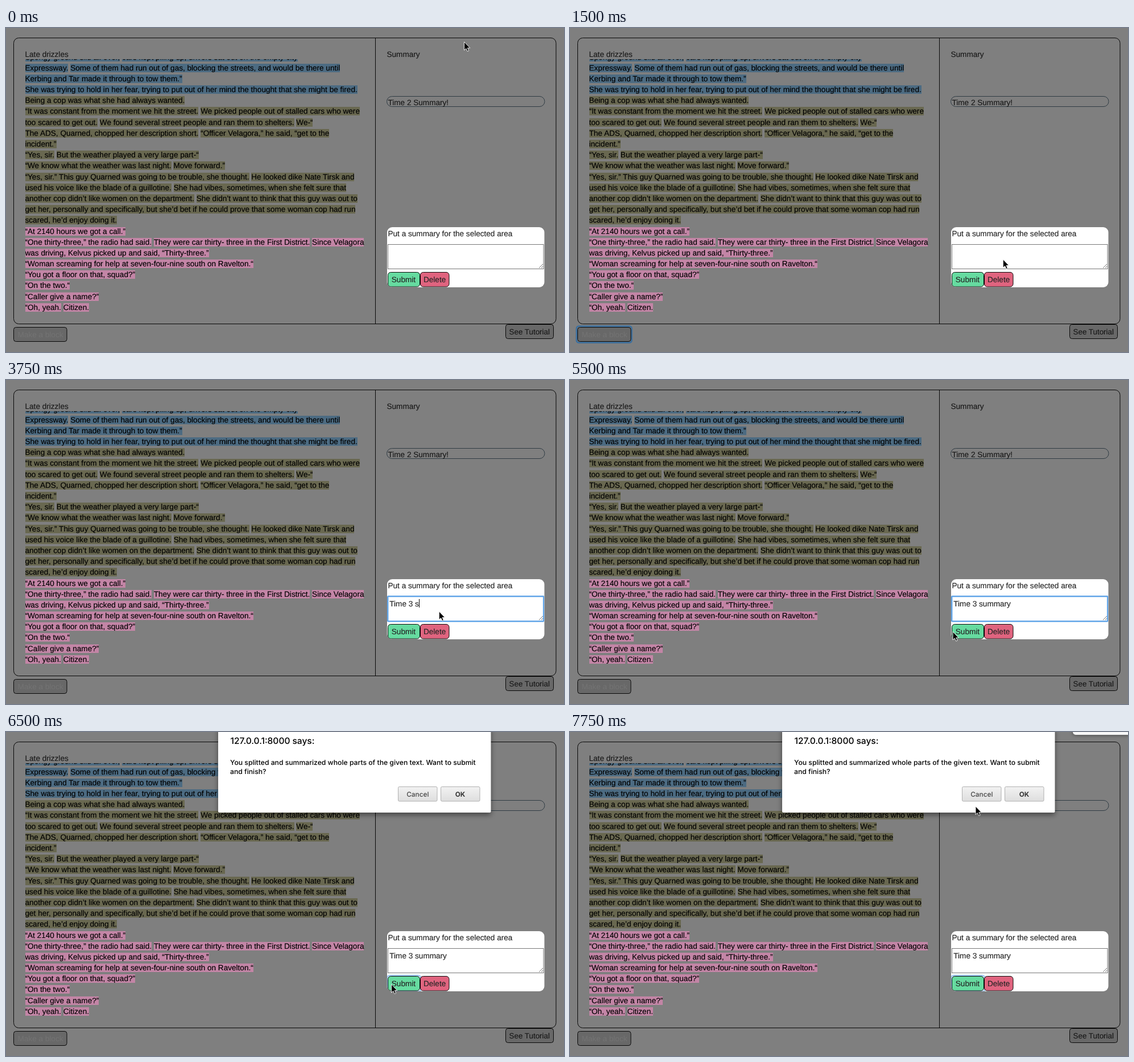
Animation of 981 by 571 pixels, one loop 8000 ms. Source, as an HTML page:

```html
<!DOCTYPE html>
<html lang="en">
<head>
<meta charset="utf-8">
<title>Summary tool</title>
<style>
  html, body { margin: 0; width: 981px; height: 571px; overflow: hidden; background: #7f7f7f; }
  body { position: relative; font: 13.58px/19.2px "Liberation Sans", Arial, sans-serif; text-rendering: geometricPrecision; }
  #story { position: absolute; left: 33.5px; top: 55px; width: 612px; height: 460px; overflow: hidden; color: #000; -webkit-text-stroke: .15px; }
  #story div { position: relative; top: -13.5px; height: 19.2px; white-space: pre; }
  svg { position: absolute; left: 0; top: 0; }
  text { fill: #262626; stroke: #262626; stroke-width: .15; white-space: pre; }
  .dim { fill: #161616; }
  .line { fill: none; stroke: #080808; }
  .button { stroke: #080808; }
  .glow { fill: none; stroke: #62a5e8; stroke-width: 2.5; }
  #dialog { font: 500 12.2px Inter, sans-serif; filter: drop-shadow(0 4px 5px #0007); }
  #dialog text { fill: #000; stroke: none; }
</style>
</head>
<body>
<div id="story"></div>
<svg width="981" height="571" viewBox="0 0 981 571">
  <defs>
    <linearGradient id="face" x2="0" y2="1"><stop stop-color="#f2f2f2"/><stop offset="1" stop-color="#dedede"/></linearGradient>
    <clipPath id="card"><rect x="670" y="351" width="276.5" height="106" rx="9"/></clipPath>
  </defs>
  <rect class="line" x="13.5" y="17.5" width="953.5" height="504" rx="9"/>
  <path class="line" d="M649.5 17.5V521"/>
  <text class="dim" x="33.5" y="51">Late drizzles</text>
  <text class="dim" x="669.5" y="51">Summary</text>
  <rect class="line" x="669.5" y="120.5" width="277.5" height="18" rx="9" style="stroke:#303c44"/>
  <text class="dim" x="671.5" y="136">Time 2 Summary!</text>

  <rect id="blockGlow" class="glow" x="11.5" y="525.5" width="97" height="29" rx="4" style="stroke:#3a6f9f"/>
  <rect class="button" x="13.5" y="527.5" width="93.5" height="25" rx="4" fill="#686868"/>
  <text x="20.5" y="544.5" style="fill:#747474;stroke:none">Make a block</text>
  <rect class="button" x="878.5" y="522.5" width="84" height="25" rx="4" fill="#686868"/>
  <text class="dim" x="884.5" y="539.5" font-size="13.4">See Tutorial</text>

  <g clip-path="url(#card)">
    <rect x="670" y="351" width="277" height="106" fill="#fff"/>
    <text x="671.5" y="367">Put a summary for the selected area</text>
    <rect x="671.5" y="381.5" width="273.5" height="43" fill="#fff" stroke="#777"/>
    <path d="M937 423l7-7M941 423l3-3" stroke="#777"/>
    <rect id="inputGlow" class="glow" x="671.2" y="381.2" width="274" height="44" rx="1"/>
    <text id="typed" x="674.3" y="398.5"></text>
    <rect id="caret" y="386" width="1" height="15" fill="#000"/>
    <rect id="submitGlow" class="glow" x="670" y="429" width="59.5" height="28.5" rx="5" style="stroke:#a0caf4"/>
    <rect class="button" x="671.5" y="430.5" width="56" height="25.5" rx="5" fill="#66dba0"/>
    <text x="677.8" y="447.5">Submit</text>
    <rect class="button" x="728.5" y="430.5" width="50.5" height="25.5" rx="5" fill="#e0647f"/>
    <text x="734" y="447.5">Delete</text>
  </g>

  <g id="dialog">
    <rect x="373" y="-9" width="479.5" height="151" rx="2" fill="#fff"/>
    <text x="394.5" y="21" font-size="15.5">127.0.0.1:8000 says:</text>
    <text x="394" y="57.5">You splitted and summarized whole parts of the given text. Want to submit</text>
    <text x="394" y="74">and finish?</text>
    <g fill="url(#face)" stroke="#b0b0b0" text-anchor="middle" font-size="11.8">
      <rect x="689.5" y="96.5" width="68.5" height="25.5" rx="2"/>
      <rect x="764.5" y="96.5" width="68.5" height="25.5" rx="2"/>
      <text x="723.8" y="113.7" style="fill:#444">Cancel</text>
      <text x="798.5" y="113.7" font-weight="bold" style="fill:#333">OK</text>
    </g>
  </g>
  <rect id="notice" x="884" y="-20" width="120" height="25" rx="5" fill="#f7f7f7" style="filter:drop-shadow(0 1px 3px #0006)"/>
  <path id="cursor" d="M0 0V14.6L3.3 11.6L5.6 16.6L8 15.6L5.8 10.7H10.3Z" fill="#000" stroke="#fff" stroke-width=".9"/>
</svg>
<script>
const blue = "#4c6b82", olive = "#696850", pink = "#c385a6";
// Bars separate the sentences that are highlighted on their own.
const story = [
  [blue, `Spongy ground slid all over,|cars kept piling up, drivers sat out on the empty city
Expressway.|Some of them had run out of gas, blocking the streets, and would be there until
Kerbing and Tar made it through to tow them.”
She was trying to hold in her fear, trying to put out of her mind the thought that she might be fired.`],
  [olive, `Being a cop was what she had always wanted.
“It was constant from the moment we hit the street.|We picked people out of stalled cars who were
too scared to get out.|We found several street people and ran them to shelters.|We-“
The ADS, Quarned, chopped her description short.|“Officer Velagora,” he said, “get to the
incident.”
“Yes, sir.|But the weather played a very large part-“
“We know what the weather was last night.|Move forward.”
“Yes, sir.” This guy Quarned was going to be trouble, she thought.|He looked dike Nate Tirsk and
used his voice like the blade of a guillotine.|She had vibes, sometimes, when she felt sure that
another cop didn’t like women on the department.|She didn’t want to think that this guy was out to
get her, personally and specifically, but she’d bet if he could prove that some woman cop had run
scared, he’d enjoy doing it.`],
  [pink, `“At 2140 hours we got a call.”
“One thirty-three,” the radio had said.|They were car thirty- three in the First District.|Since Velagora
was driving, Kelvus picked up and said, “Thirty-three.”
“Woman screaming for help at seven-four-nine south on Ravelton.“
“You got a floor on that, squad?”
“On the two.“
“Caller give a name?”
“Oh, yeah.|Citizen.`]
];
const $ = id => document.getElementById(id);

$("story").innerHTML = story.map(([color, lines]) => lines.split("\n").map(line =>
  `<div>${line.split("|").map(s => `<span style="background:${color}">${s}</span>`).join(" ")}</div>`
).join("")).join("");

const pointer = [[0, 805.5, 24.5], [250, 764.5, 395], [500, 760.8, 407], [750, 761.3, 407.8], [5500, 673, 443.5],
  [5750, 677.5, 444.8], [7250, 640, 203], [7500, 685, 163], [7750, 713, 131]];
const typing = [[0, 0], [2750, 2], [3000, 3], [3250, 5], [3500, 7], [3750, 8], [4250, 9], [4500, 10], [4750, 12], [5000, 14]];
const caretSpans = [[2000, 2500], [2750, 5500], [6000, 6250]];

const at = (steps, t) => steps.findLast(step => step[0] <= t);
const within = (t, from, to = 8000) => t >= from && t < to;
const show = (id, on) => $(id).style.visibility = on ? "visible" : "hidden";

function draw(t) {
  const [, x, y] = at(pointer, t);
  $("cursor").setAttribute("transform", `translate(${x} ${y})`);
  $("typed").textContent = "Time 3 summary".slice(0, at(typing, t)[1]);
  $("caret").setAttribute("x", Math.round(674 + $("typed").getComputedTextLength()));
  show("caret", caretSpans.some(span => within(t, ...span)));
  show("blockGlow", within(t, 1500, 2000));
  show("inputGlow", within(t, 2000, 6250));
  show("submitGlow", within(t, 6250));
  show("dialog", within(t, 6500));
  show("notice", within(t, 7750));
}

const start = performance.now();
function tick() {
  draw((performance.now() - start) % 8000);
  requestAnimationFrame(tick);
}
tick();
</script>
</body>
</html>
```
